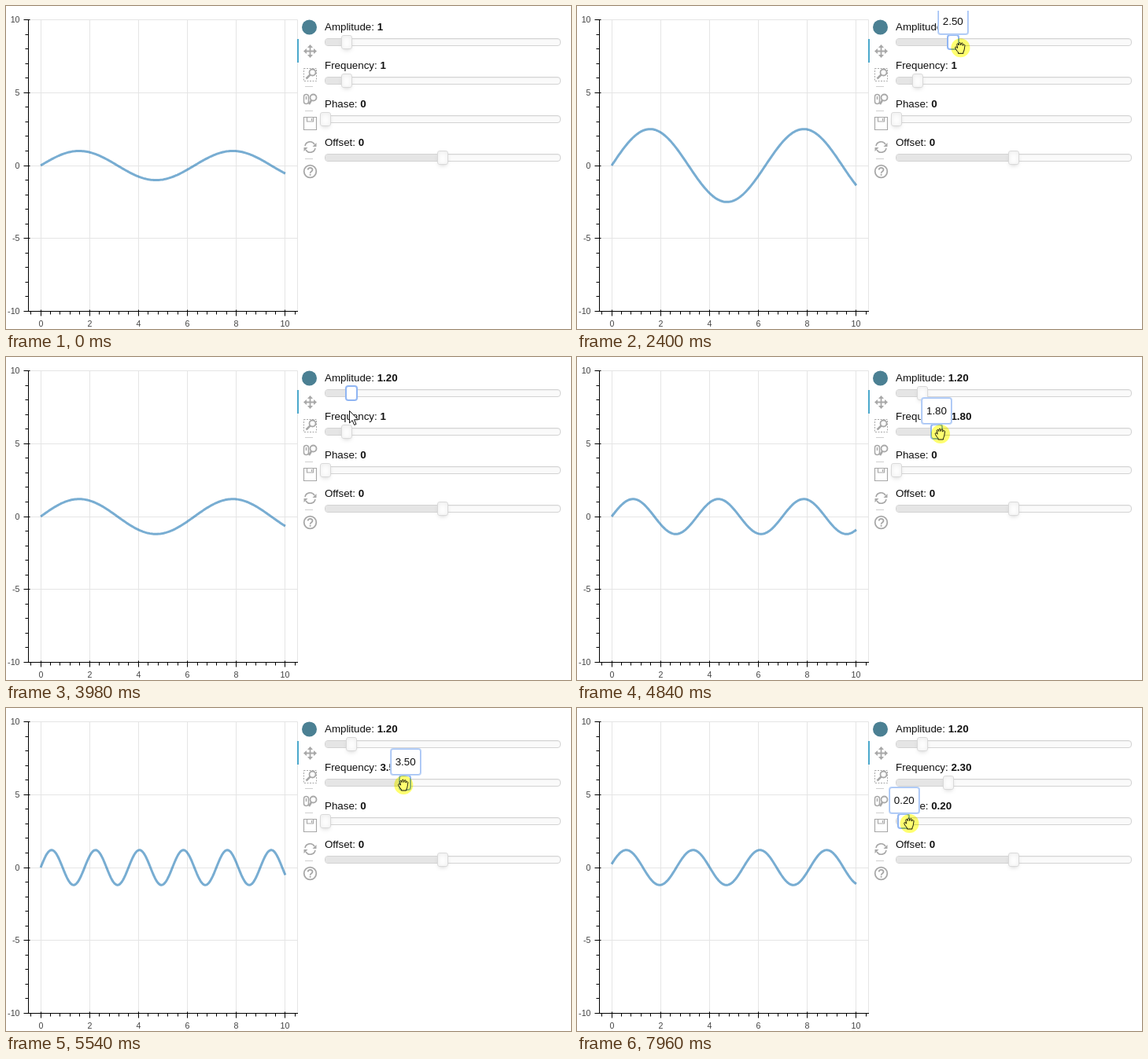
Recreate the animation shown at these times as an HTML page. Size 718 by 411 pixels, loop 8000 ms.

```html
<!DOCTYPE html>
<html lang="en">
<head>
<meta charset="utf-8">
<title>Sine sliders</title>
<style>
html, body { margin: 0; width: 718px; height: 411px; overflow: hidden; background: #fff; }
body { position: relative; font: 13.333px/16px "Liberation Sans", Arial, sans-serif; color: #111; }
svg, #panel, #panel div { position: absolute; box-sizing: border-box; }
svg { left: 0; top: 0; }
#panel { left: 0; top: 6px; width: 718px; height: 405px; overflow: hidden; }
#panel .label { left: 405px; white-space: pre; }
#panel .track { left: 405px; width: 300px; height: 10px; border: 1px solid #d3d3d3; border-radius: 4px;
  background: #fafafa; box-shadow: inset 0 1px 1px #f0f0f0; overflow: hidden; }
#panel .fill { left: 0; top: 0; height: 8px; background: #e5e5e5; }
#panel .handle { width: 14px; height: 18px; border: 1px solid #d9d9d9; border-radius: 3px; background: #fff;
  box-shadow: inset 0 0 1px #fff, inset 0 1px 7px #ebebeb, 0 3px 6px -3px #bbb; }
#panel .tip { z-index: 1; height: 33px; padding: 5px; border: 1px solid #d9d9d9; border-radius: 3px;
  background: #fff; line-height: 21px; transform: translateX(-50%); white-space: nowrap; }
#panel .handle.focus { border-color: #8fb5f3; box-shadow: 0 0 0 1px #8fb5f3; }
#panel .tip.focus { border-color: #a3c2f4; box-shadow: 0 0 0 1px #bdd4f8; }
text { font: 10.667px "Liberation Sans", Arial, sans-serif; fill: #444; }
#press { mix-blend-mode: multiply; }
</style>
</head>
<body>
<svg width="718" height="411" fill="none">
  <path id="grid" stroke="#e5e5e5"/>
  <path id="curve" stroke="#1f77b4" stroke-opacity=".6" stroke-width="3" stroke-linejoin="round"/>
  <path id="axes" stroke="#000"/>
  <g id="ticks"></g>
  <circle cx="385.5" cy="27" r="9.5" fill="#4b8093"/>
  <path d="M371 42V72" stroke="#4ba9cc" stroke-width="2"/>
  <path d="M380 102.5h10M380 133.5h10M380 194.5h10" stroke="#d0d0d0"/>
  <g stroke="#a8a8a8" stroke-width="1.8">
    <path d="M380 57.5h13M386.5 51v13"/>
    <path d="M386.5 49l3.5 4h-7zM386.5 66l3.5-4h-7zM378 57.5l4-3.500v7zM395 57.5l-4-3.500v7z" fill="#a8a8a8" stroke="none"/>
    <path d="M378.5 79.5h16v16h-16z" stroke-width="1" stroke-dasharray="2 1.5"/>
    <circle cx="389.5" cy="84.500" r="4" fill="#fff"/><path d="M386.5 87.5l-5 5" stroke-width="2.5"/>
    <rect x="378.5" y="112.5" width="6" height="12" rx="3" stroke-width="1.5"/><path d="M381.5 115v4" stroke-width="1.5"/>
    <circle cx="390.5" cy="116.5" r="4"/><path d="M388 120l-3 5" stroke-width="2.5"/>
    <path d="M378.5 141.5h16v16h-16zM382.5 141.5v5.5h8v-5.5M388.5 143v3" stroke-width="1.2"/>
    <path d="M380 178a6.500 6.500 0 0 1 12-2M393 181a6.500 6.500 0 0 1-12 2" stroke-width="1.6"/>
    <path d="M394.5 174v5h-5zM378.5 185v-5h5z" fill="#a8a8a8" stroke="none"/>
    <circle cx="386.5" cy="210.5" r="7.8"/>
    <path d="M383.7 208.5c0-3.600 5.800-3.600 5.800 0c0 2-2.900 2-2.900 4.200M386.6 213.8v2"/>
  </g>
</svg>
<div id="panel"></div>
<svg width="718" height="411" fill="#fff" stroke="#111" stroke-linejoin="round">
  <path id="arrow" d="M.5 .5V16l3.600-3.400 2.500 5.900 2.400-1-2.500-5.700h5z"/>
  <path id="hand" d="M-3 7V5.500C-5 3.500-7 .5-6.700-.8C-6.300-1.800-5-1.500-3.900 .2L-4.600-4.200C-4.700-5.800-3-6-2.600-4.600L-2.200-3.400L-2-5.800C-1.800-7.200-.1-7.200 0-5.800L.2-3.500L.9-5.600C1.400-6.900 3-6.400 2.800-5L2.600-3L3.600-3.900C4.400-4.800 5.800-4 5.500-2.800C5 0 5 3 3.500 5.500V7Z"/>
</svg>
<svg id="press" width="718" height="411"><circle id="glow" r="12" fill="#ffff70"/></svg>
<script>
const $ = id => document.getElementById(id);
const LOOP = 8000, TICK = 78.5;
const px = v => 28.5 + 342 * (v + .5) / 11;
const py = v => 203 - 18.55 * v;
const snap = v => Math.round(v - .5) + .5;
const trackY = i => 46 + 49 * i;

// Values move linearly through [time, value] points.
const sliders = [
  { name: 'Amplitude', min: .1, span: 10, keys: [[1700, 1], [2720, 3.2], [2800, 3.2], [3550, 1.2]] },
  { name: 'Frequency', min: .1, span: 10, keys: [[4450, 1], [5240, 2.7], [5520, 3.5], [5770, 3.5], [6320, 2.3]] },
  { name: 'Phase', min: 0, span: 6.28, keys: [[7480, 0], [7940, .2]] },
  { name: 'Offset', min: -5, span: 10, keys: [[0, 0]] }
];

// Each drag approaches its slider, presses, moves and releases.
const drags = [
  { from: [429, 3], enter: 600, arrive: 1150, press: 1390, release: 3900, grab: 3, sag: 9 },
  { from: [438, 57], enter: 3900, arrive: 4280, press: 4450, release: 6320, grab: -2, sag: 0 },
  { from: [458, 124], enter: 6540, arrive: 7180, press: 7330, release: LOOP, grab: 7, sag: 0 }
];

function drawPlot() {
  let grid = 'M28.5 17.5H370.5V388.5', axes = 'M28.5 17V389M28 388.5H371', labels = '';
  for (let v = 0; v <= 10; v += 2) {
    const x = snap(px(v));
    grid += `M${x} 17V388`;
    axes += `M${x} 386.5V394.5`;
    labels += `<text x="${x}" y="408" text-anchor="middle">${v}</text>`;
  }
  for (let i = -1; i <= 26; i++) axes += `M${snap(px(i * .4))} 388.5V392.5`;
  for (let v = -10; v <= 10; v++) {
    const y = snap(py(v));
    axes += `M24.5 ${y}H28.5`;
    if (v % 5) continue;
    grid += `M29 ${y}H370`;
    axes += `M22.5 ${y}H30.5`;
    labels += `<text x="17.5" y="${y + 3}" text-anchor="end">${v}</text>`;
  }
  $('grid').setAttribute('d', grid);
  $('axes').setAttribute('d', axes);
  $('ticks').innerHTML = labels;
}

function addDiv(cls, top, parent = $('panel')) {
  const el = document.createElement('div');
  el.className = cls;
  el.style.top = top + 'px';
  return parent.appendChild(el);
}

function buildSliders() {
  sliders.forEach((s, i) => {
    const y = trackY(i) - 6;
    s.label = addDiv('label', y - 27);
    s.fill = addDiv('fill', 0, addDiv('track', y - 5));
    s.handle = addDiv('handle', y - 9);
    s.tip = addDiv('tip', y - 43);
  });
}

const mix = (a, b, k) => a + (b - a) * k;
const progress = (t, a, b) => Math.min(1, Math.max(0, (t - a) / (b - a)));
const easeOut = k => 1 - (1 - k) ** 2;
const format = v => Number.isInteger(v) ? String(v) : v.toFixed(2);
const handleX = (s, v) => 406 + 298 * (v - s.min) / s.span;

function valueAt({ keys }, t) {
  return keys.reduce((v, [time, next], i) =>
    i ? mix(v, next, progress(t, keys[i - 1][0], time)) : next, 0);
}

function pointerAt(t) {
  const i = drags.findLastIndex(d => d.enter <= t);
  if (i < 0) return { x: 472, y: 126, shown: t >= 220 && t < 290, over: -1 };
  const d = drags[i], s = sliders[i];
  const near = easeOut(progress(t, d.enter, d.arrive));
  // The pointer runs slightly ahead of the handle it drags.
  const x = mix(d.from[0], handleX(s, valueAt(s, t + 120)) + d.grab, near);
  const y = mix(d.from[1], trackY(i) + 3 + d.sag * progress(t, 1620, 3200), near);
  const pressed = t >= d.press && t < d.release;
  const inside = Math.abs(x - handleX(s, valueAt(s, t))) < 8 && Math.abs(y - trackY(i)) < 9;
  return { x, y, pressed, shown: true, over: pressed || inside ? i : -1 };
}

function place(el, shown, x, y) {
  el.style.visibility = shown ? 'visible' : 'hidden';
  el.setAttribute('transform', `translate(${x} ${y})`);
}

function draw(now) {
  // The screen refreshes in steps.
  const t = now < 600 ? now : (Math.floor(now / TICK - .35) + .35) * TICK;
  const { x, y, shown, pressed, over } = pointerAt(t);
  const focus = drags.findLastIndex(d => d.press + 80 <= t && t > sliders[drags.indexOf(d)].keys[0][0] - 60);

  const [amp, freq, phase, offset] = sliders.map((s, i) => {
    const v = Math.round(valueAt(s, t) * 10) / 10;
    const hx = handleX(s, v);
    s.label.innerHTML = `${s.name}: <b>${format(v)}</b>`;
    s.fill.style.width = hx - 406 + 'px';
    s.handle.style.left = Math.round(hx - 7) + 'px';
    s.tip.style.left = hx + .3 + 'px';
    s.tip.style.display = i === over ? 'block' : 'none';
    s.tip.textContent = format(v);
    for (const el of [s.handle, s.tip]) el.classList.toggle('focus', i === focus);
    return v;
  });

  let d = '';
  for (let i = 0; i < 200; i++) {
    const u = i * 10 / 199;
    d += `${i ? 'L' : 'M'}${px(u).toFixed(2)} ${py(offset + amp * Math.sin(freq * u + phase)).toFixed(2)}`;
  }
  $('curve').setAttribute('d', d);

  place($('arrow'), shown && over < 0, Math.round(x), Math.round(y));
  place($('hand'), shown && over >= 0, x, y);
  place($('glow'), pressed, x, y);
}

drawPlot();
buildSliders();
const begin = performance.now();
function frame() {
  draw((performance.now() - begin) % LOOP);
  requestAnimationFrame(frame);
}
frame();
</script>
</body>
</html>
```
